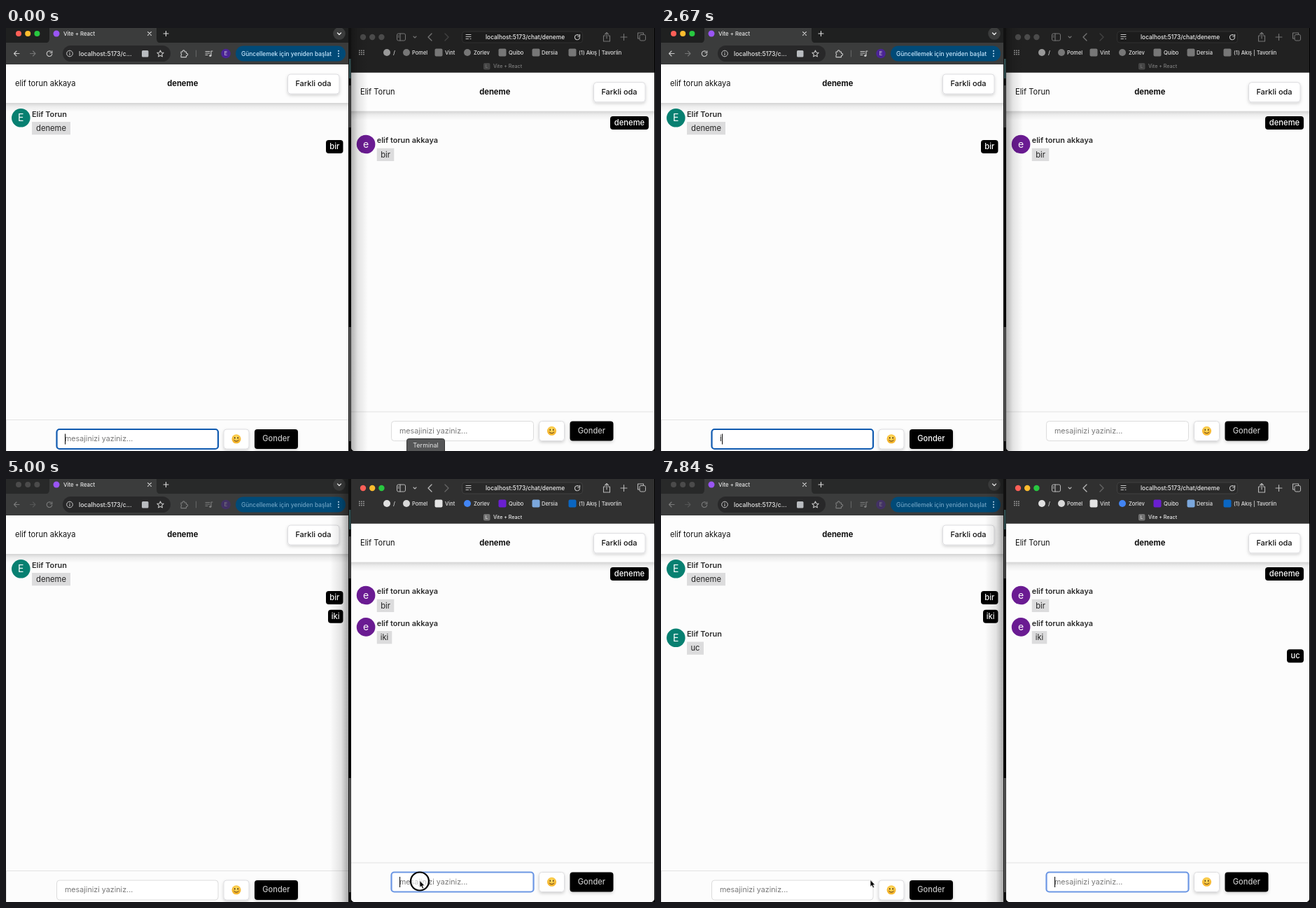
An HTML page for the animation above (8 s loop, 927 by 604 pixels).

```html
<!DOCTYPE html>
<html lang="tr">
<head>
<meta charset="utf-8">
<title>Chat</title>
<style>
  html, body { margin: 0; width: 100%; height: 100%; overflow: hidden; background: #000; }
  svg { display: block; width: 927px; height: 604px; font-family: Inter, "Open Sans", sans-serif; }
</style>
</head>
<body>
<svg id="stage" viewBox="0 0 927 604"></svg>
<script>
const LOOP = 8000, FPS = 6;
const ME = 'Elif Torun', OTHER = 'elif torun akkaya';
const stage = document.getElementById('stage');

const rect = (x, y, w, h, fill, r = 0, extra = '') =>
  `<rect x="${x}" y="${y}" width="${w}" height="${h}" rx="${r}" fill="${fill}" ${extra}/>`;
const dot = (x, y, r, fill, extra = '') =>
  `<circle cx="${x}" cy="${y}" r="${r}" fill="${fill}" ${extra}/>`;
const line = (d, color = '#c8c8c8', width = 1.1) =>
  `<path d="${d}" fill="none" stroke="${color}" stroke-width="${width}" stroke-linecap="round" stroke-linejoin="round"/>`;
const text = (x, y, str, size, fill, weight = 400, anchor = 'start') =>
  `<text x="${x}" y="${y}" font-size="${size}" fill="${fill}" font-weight="${weight}" text-anchor="${anchor}">${str}</text>`;
const group = (content, attrs) => `<g ${attrs}>${content}</g>`;

const defs = `<defs>
  <linearGradient id="toRight"><stop stop-color="#000" stop-opacity=".3"/><stop offset=".4" stop-color="#000" stop-opacity=".1"/><stop offset="1" stop-color="#000" stop-opacity="0"/></linearGradient>
  <linearGradient id="toLeft"><stop stop-color="#000" stop-opacity="0"/><stop offset=".6" stop-color="#000" stop-opacity=".1"/><stop offset="1" stop-color="#000" stop-opacity=".33"/></linearGradient>
  <linearGradient id="drop" x2="0" y2="1"><stop stop-color="#000" stop-opacity=".16"/><stop offset=".4" stop-color="#000" stop-opacity=".06"/><stop offset="1" stop-color="#000" stop-opacity="0"/></linearGradient>
  <radialGradient id="face" cy=".35"><stop stop-color="#ffe36b"/><stop offset="1" stop-color="#f5b52c"/></radialGradient>
  <filter id="soft" x="-20%" y="-40%" width="140%" height="200%"><feDropShadow dx="0" dy="2" stdDeviation="2" flood-opacity=".17"/></filter>
  <clipPath id="rightWindow"><path d="M493 0H926V598Q926 604 920 604H499Q493 604 493 598Z"/></clipPath>
</defs>`;

const lights = (x, y, r, on) => ['#ff5f57', '#febc2e', '#28c840']
  .map((c, i) => dot(x + i * 13.2, y, r, on ? c : '#4b4b4b')).join('');
const reload = (x, y, r) =>
  line(`M${x + r} ${y + .5}A${r} ${r} 0 1 1 ${x + r * .6} ${y - r * .75}M${x + r} ${y - r}v2.8h-2.8`);

// Browser frame of the left window
function leftChrome(on) {
  const tools = [
    line('M19 36.5H11.5M15 33l-3.5 3.5 3.5 3.5'),
    group(line('M34.5 36.5H42M38.5 33l3.5 3.5-3.5 3.5'), 'opacity=".4"'),
    reload(62, 36.5, 3.8),
    line('M250 34h2.2a1.6 1.6 0 1 1 3 0h2.3v2.3a1.6 1.6 0 1 1 0 3v2.3h-7.5v-2.6a1.5 1.5 0 0 0 0-2.6z'),
    line('M285 33.5h6M285 36h6M285 38.5h3M293 39.5V33h2'), dot(291.8, 39.5, 1.6, '#c8c8c8'),
    dot(314, 36.5, 6.8, '#4b2496'), text(314, 39.3, 'E', 7.5, '#ddd', 400, 'middle')
  ].join('');
  return rect(0, 0, 489, 22, on ? '#1f2020' : '#282929')
    + rect(0, 21, 489, 31.5, '#3b3c3c')
    + '<path d="M55 22Q62 22 62 15V0H215V15Q215 22 222 22Z" fill="#3b3c3c"/>'
    + lights(18, 8, 4, on) + dot(72, 8, 4.5, '#9a55f5')
    + text(82, 10.8, 'Vite + React', 7.8, '#e6e6e6', 500)
    + line('M202.6 5.6l4.8 4.8M207.4 5.6l-4.8 4.8', '#ddd') + line('M225 8h7M228.5 4.5v7', '#ddd')
    + dot(476, 8, 8.8, '#3b3c3c') + line('M473.5 7l2.5 2.5 2.5-2.5', '#eee', 1.3)
    + group(tools, `opacity="${on ? 1 : .45}"`)
    + rect(81, 25, 154, 23, '#282829', 11.5)
    + dot(91, 36.5, 4.3, 'none', 'stroke="#ccc"') + line('M91 36v2.5M91 34.3v.1')
    + text(104, 39.7, 'localhost:5173/c...', 8.7, '#e8e8e8', 500)
    + rect(194, 32, 9.5, 9.5, '#b9bcc0', 1.5)
    + line('M220.5 32l1.4 3 3.2.4-2.4 2.2.7 3.3-2.9-1.7-2.9 1.7.7-3.3-2.4-2.2 3.2-.4z')
    + line('M271.5 32v9', '#666', 1)
    + rect(328, 25.5, 157, 22, '#004a77', 11)
    + group(text(336, 39.6, 'Güncellemek için yeniden başlat', 8.4, '#c8e8ff', 500), `opacity="${on ? 1 : .55}"`)
    + [32.8, 36.5, 40.2].map(y => dot(475, y, 1, '#c8e8ff')).join('');
}

// Browser frame of the right window
function rightChrome(on) {
  const marks = [
    [572, 580, 'Pomel', '#d8d8d8', 1], [618, 627, 'Vint', '#e4e4e4'], [659, 668, 'Zorlev', '#4285f4', 1],
    [709, 718, 'Quibo', '#6a1fd0'], [757, 765, 'Dersia', '#7ba7dc'], [809, 818, '(1) Akış | Tavorlin', '#0a66c2']
  ].map(([x, tx, label, color, round]) => {
    const fill = on ? color : '#777';
    return (round ? dot(x, 35, 5, fill) : rect(x - 5.5, 29.5, 11, 11, fill, 2))
      + text(tx, 37.7, label, 7.5, '#e2e2e2', 500);
  }).join('');
  const icons = [
    rect(558.5, 8, 12, 10, 'none', 2, 'stroke="#c8c8c8"'), line('M563 8v10M560.2 11h1M560.2 13h1'),
    line('M582 12l2 2 2-2'), line('M608 8l-5 5 5 5', '#c8c8c8', 1.3),
    group(line('M627 8l5 5-5 5', '#c8c8c8', 1.3), 'opacity=".4"'),
    line('M856 11h-2.5v8h9v-8H860M858 15V6.5M855.5 9l2.5-2.5 2.5 2.5'),
    line('M878 13h9M882.5 8.5v9'),
    rect(905, 9.5, 8.5, 8.5, 'none', 2, 'stroke="#c8c8c8"'), line('M905 15h-2.5V7h8v2.5')
  ].join('');
  const grid = [0, 1, 2].flatMap(r => [0, 1, 2].map(c => rect(504 + c * 3, 31.5 + r * 2.7, 1.8, 1.5, '#999'))).join('');
  return rect(493, 0, 434, 64.5, on ? '#303030' : '#212121')
    + lights(510, 13, 4.2, on)
    + group(icons, `opacity="${on ? .9 : .5}"`)
    + rect(651.5, 5, 172, 16, on ? '#292929' : '#1c1c1c', 4, `stroke="${on ? '#404040' : '#303030'}"`)
    + line('M657 9.5h7M657 12.5h7M657 15.5h3.5M663 15.5h1')
    + text(685, 16, 'localhost:5173/chat/deneme', 8.35, '#eee', 500) + reload(816, 13, 3.6)
    + grid + dot(544, 35, 5, on ? '#e0e0e0' : '#999') + text(553, 38, '/', 8, '#ddd', 500) + marks
    + group(rect(682, 50, 9.5, 9.5, '#737373', 2) + text(686.7, 57.3, 'L', 6.5, '#eee', 400, 'middle')
      + text(696, 57.4, 'Vite + React', 7.1, '#eee', 500), `opacity="${on ? 1 : .45}"`)
    + rect(493, 63.5, 434, 1, '#111');
}

const card = (x, y, w, h) => rect(x, y, w, h, '#fff', 4, 'stroke="#dcdcdf" stroke-width="1" filter="url(#soft)"');

const smiley = (x, y) => dot(x, y, 6.5, 'url(#face)')
  + [-2.2, 2.2].map(d => `<ellipse cx="${x + d}" cy="${y - 1.5}" rx=".85" ry="1.2" fill="#5b3a12"/>`).join('')
  + line(`M${x - 3.2} ${y + 1.8}Q${x} ${y + 5} ${x + 3.2} ${y + 1.8}`, '#5b3a12', 1);

function header(x, right, y, user, titleX) {
  return rect(x, y, right - x, 55, '#fdfdfd') + rect(x, y + 55, right - x, 13, 'url(#drop)')
    + text(x + 13, y + 31, user, 11.1, '#111', 400)
    + text(titleX, y + 31, 'deneme', 11.2, '#111', 700, 'middle')
    + card(right - 86.5, y + 14, 73.5, 28)
    + text(right - 50, y + 31, 'Farkli oda', 11, '#111', 500, 'middle');
}

// Message form; ring is the focus outline colour
function form(x, right, y, inputX, inputW, typed, focused, caret, ring) {
  const top = y + 14, base = y + 31, bx = inputX + inputW + 8;
  const tx = inputX + 11.5;
  const tail = { i: 3, ik: 9, iki: 12, u: 6.8, uc: 13 }[typed] || 0;
  return rect(x, y, right - x, 604 - y, '#fcfcfc') + rect(x, y, right - x, 1, '#e3e3e3')
    + rect(inputX, top, inputW, 28, '#fff', 4, `stroke="${focused ? ring : '#dcdcdc'}" stroke-width="${focused ? 2.2 : 1}"`)
    + text(tx, base, typed || 'mesajinizi yaziniz...', typed ? 11.2 : 10.7, typed ? '#111' : '#777')
    + (caret ? rect(tx + tail, top + 6.5, 1.1, 15, '#111') : '')
    + card(bx, top, 36, 28) + smiley(bx + 18, top + 13.8)
    + rect(bx + 44, top, 62, 28, '#000', 4, 'filter="url(#soft)"')
    + text(bx + 75, base, 'Gonder', 11.1, typed ? '#fff' : '#c4c4c4', 500, 'middle');
}

const received = (x, y, name, msg, w, color) => dot(x + 13.3, y, 13.3, color)
  + text(x + 13.3, y + 5, name[0], 14, '#fff', 400, 'middle')
  + text(x + 29, y - 1.8, name, 10.9, '#2c2c2c', 600)
  + rect(x + 29, y + 5.7, w, 18.3, '#dcdcdd')
  + text(x + 29 + w / 2, y + 18.5, msg, 11.2, '#222', 400, 'middle');

const sent = (right, y, msg, w) => rect(right - w, y, w, 19, '#000', 4)
  + text(right - w / 2, y + 13, msg, 11.2, '#fff', 500, 'middle');

function pointer(t) {
  const hidden = t < 500 || (t >= 2660 && t < 4160) || (t >= 6160 && t < 7330);
  if (hidden) return '';
  const moves = [[400, 1000, 598, 604, 231, 585], [4000, 4830, 231, 585, 591, 573.5], [7170, 7830, 591, 573.5, 299, 572.5]];
  const [t0, t1, x0, y0, x1, y1] = moves.filter(m => t >= m[0]).pop();
  const p = Math.min(1, (t - t0) / (t1 - t0)), e = p * p * (3 - 2 * p);
  const x = x0 + (x1 - x0) * e, y = y0 + (y1 - y0) * e;
  const pressed = (t >= 1000 && t < 1330) || (t >= 5000 && t < 5160);
  return (pressed ? dot(x, y + 1, 13, '#fff', 'fill-opacity=".6" stroke="#000" stroke-width="2.2"') : '')
    + `<path transform="translate(${x} ${y})" d="M0 0V9.8L2.2 7.8 3.8 11.4 5.6 10.6 4 7.2H7Z" fill="#000" stroke="#fff" stroke-width=".7"/>`;
}

const latest = (steps, t) => steps.reduce((v, [at, next]) => t >= at ? next : v, '');
const within = (t, spans) => spans.some(([a, b]) => t >= a && t < b);

function draw(t) {
  const leftOn = t < 5000;
  const leftText = latest([[2660, 'i'], [2830, 'ik'], [3160, 'iki'], [3500, '']], t);
  const rightText = latest([[6160, 'u'], [6500, 'uc'], [6830, '']], t);
  const leftCaret = leftOn && !within(t, [[500, 1000], [1830, 2330], [4160, 5000]]);
  const rightCaret = !leftOn && !within(t, [[5500, 6000], [7330, 7830]]);

  const left = rect(0, 52, 489, 552, '#fcfcfc') + leftChrome(leftOn)
    + header(0, 489, 52, OTHER, 252.3)
    + received(8, 128.3, ME, 'deneme', 55, '#078071') + sent(481.5, 160, 'bir', 24.5)
    + (t >= 3500 ? sent(481.5, 186.8, 'iki', 21.5) : '')
    + (t >= 7000 ? received(8, 226.8, ME, 'uc', 24, '#078071') : '')
    + form(0, 489, 559, 72.5, 230.5, leftText, leftOn, leftCaret, '#0f5ab0')
    + rect(0, 559, 1, 45, '#e3e3e3');

  const right = rect(493, 64, 434, 540, '#fcfcfc') + rightChrome(!leftOn)
    + header(493, 926, 63.7, ME, 698.3)
    + sent(918, 126, 'deneme', 55) + received(500.8, 166, OTHER, 'bir', 24.5, '#6a1b92')
    + (t >= 3660 ? received(500.8, 211.4, OTHER, 'iki', 21.5, '#6a1b92') : '')
    + (t >= 6830 ? sent(918, 243.3, 'uc', 24) : '')
    + form(493, 926, 547.5, 550.5, 203, rightText, !leftOn, rightCaret, '#6c97e4');

  const gap = rect(489, 0, 4, 604, '#111') + rect(490, 44, 2.5, 28, '#315052')
    + rect(490, 82, 2.5, 60, '#484848') + rect(489, 142, 4, 285, '#000') + rect(490, 427, 2.5, 163, '#585858');

  const shade = leftOn ? rect(493, 0, 24, 604, 'url(#toRight)') : rect(463, 0, 26, 604, 'url(#toLeft)');
  const tip = t < 500 ? rect(572.5, 586.5, 54, 22, '#555657', 3, 'stroke="#333"')
    + text(599.5, 598.8, 'Terminal', 9, '#e4e4e4', 400, 'middle') : '';

  stage.innerHTML = defs + rect(0, 0, 927, 604, '#000') + left + gap
    + group(right, 'clip-path="url(#rightWindow)"') + shade + tip + pointer(t);
}

let shown = -1;
function tick(now) {
  const step = Math.floor((now % LOOP) * FPS / 1000);
  if (step !== shown) draw((shown = step) * 1000 / FPS);
  requestAnimationFrame(tick);
}
tick(0);
</script>
</body>
</html>
```
